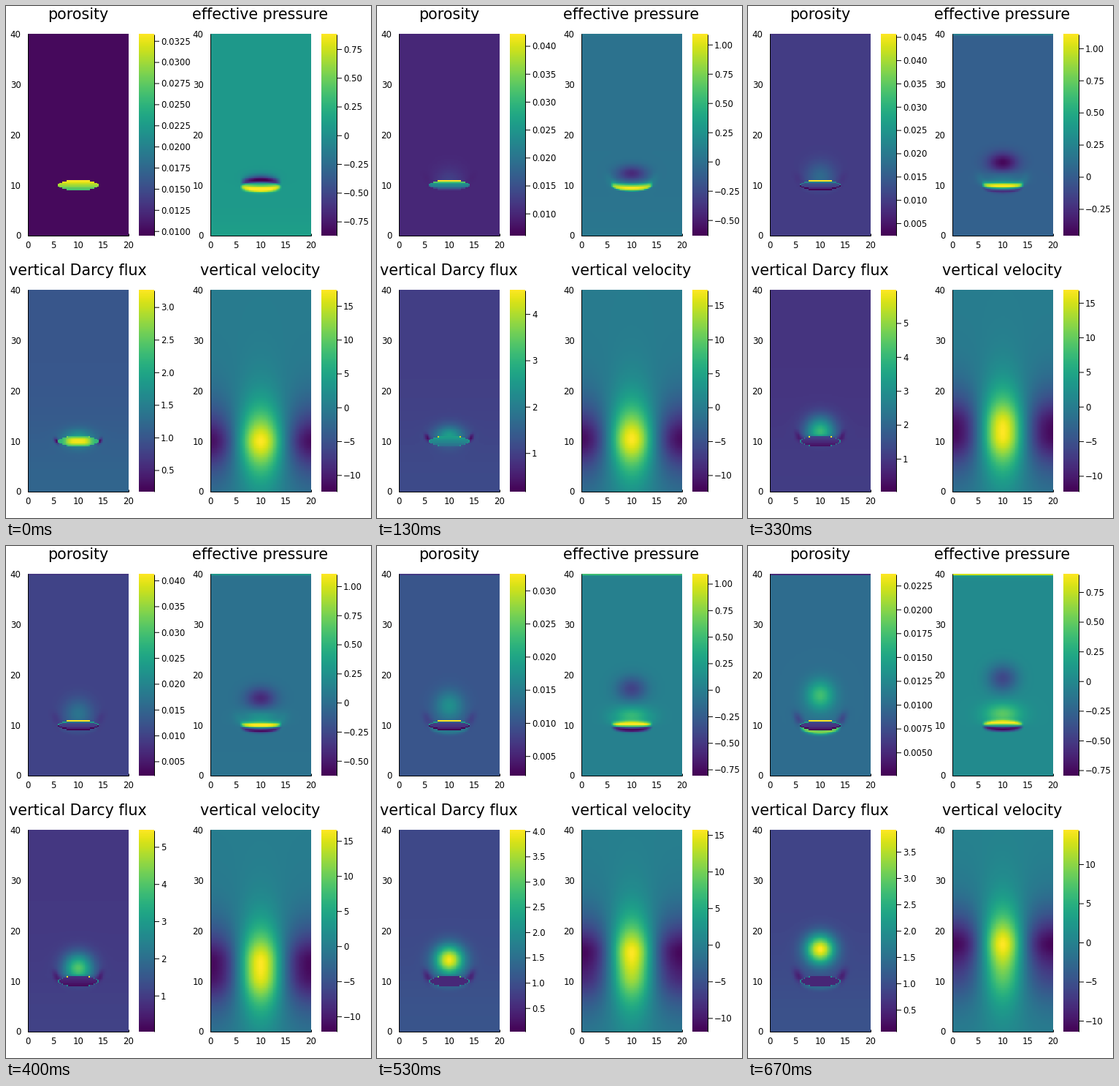
These frames come from a looping animation (500 by 700 pixels, 740 ms). A matplotlib script:

```python
import numpy as np
import matplotlib.pyplot as plt
from matplotlib.animation import FuncAnimation

W, H, DPI = 500, 700, 100
PX = 72 / DPI                      # points per pixel
TITLE, LABEL = 20.6, 11.77         # text sizes in pixels
TICK_MS, LOOP_MS = 10, 740
STEPS = 11
STARTS = [round(k * 20 / 3) * 10 for k in range(STEPS)]

# grid over 20 x 40, first row at the top; inclusion with half axes 4 and 1 at (10, 10)
CELL = 0.25
x, y = np.meshgrid(np.arange(CELL / 2, 20, CELL), np.arange(40 - CELL / 2, 0, -CELL))
dx, dy = x - 10, y - 10
half = np.sqrt(np.clip(1 - (dx / 4) ** 2, 0, 1))
inside = np.abs(dx / 4) ** 2.2 + np.abs(dy) ** 2.2 <= 1
top_rim = inside & ~np.roll(inside, 1, 0)
low_rim = inside & ~np.roll(inside, -1, 0)
side = inside & ~(np.roll(inside, 1, 1) & np.roll(inside, -1, 1))
corner = side & (top_rim | low_rim)
crown = corner & (dy > 0.8)
height = np.clip(dy / 0.875, -1, 1)
envelope = (0.55 + 0.45 * half) / (1 + np.exp((np.abs(dx) - 3.95) / 0.15))


def ramp(s, a, b):
    return min(max((s - a) / (b - a), 0), 1)


def mix(s, a, b):
    return a + (b - a) * s


def path(*points):
    ks, vs = zip(*points)
    return lambda k: np.interp(k, ks, vs)


def blob(cy, sx, sy):
    return np.exp(-(dx / sx) ** 2 - ((y - cy) / sy) ** 2)


def wings(cy, w):
    """Two slanted patches beside the tips of the inclusion."""
    off = np.abs(dx) - 4.3 - 0.35 * (y - cy)
    return np.exp(-(off / w) ** 2 - ((y - cy) / (1.6 * w)) ** 2)


def lens(c, low, up):
    """Band that follows the curve of the inclusion, c half heights off its middle."""
    d = dy - c * half
    return envelope * np.exp(-(d / np.where(d < 0, low, up)) ** 2)


def above(level):
    return 1 / (1 + np.exp(-np.clip((y - level) / 0.15, -50, 50)))


def rise(s):
    """Height of the fluid plume."""
    return 10.5 + 5.8 * s ** 2


# each field takes the progress s from 0 to 1 and its colour limits
def porosity(s, lo, hi):
    mid = 0.0055 + 0.0245 * np.exp(-(s / 0.42) ** 1.5)
    low = 0.004 + 0.0225 * np.exp(-(s / 0.25) ** 1.3)
    v = 0.0101 + 0.0072 * ramp(s, 0, 0.45) * blob(rise(s) - 0.4, 2.8, 3) * above(10)
    v += 0.0105 * s ** 3.5 * lens(-1.35, 0.5, 0.5)
    v -= 0.003 * s * wings(11.2, 0.9)
    body = np.where(height > 0, mid + (hi - mid) * np.abs(height) ** (1 + 6 * s),
                    mid + (mid - low) * height)
    v = np.where(inside, body, v)
    rim = lo + (hi - lo) * 0.55 * ramp(s, 0.1, 0.6)
    v[top_rim] = np.maximum(v[top_rim], rim)
    v[low_rim] += ramp(s, 0.1, 0.5) * (lo - v[low_rim])
    v[0] -= 0.005 * s ** 2.5
    return v


def pressure(s, lo, hi):
    early = 1 - ramp(s, 0, 0.2)
    v = 0.02 + 0.04 * early + 0.06 * (1 - s) ** 2 * np.exp(-y / 5)
    soft = mix(early, 0.2, 0.7)
    bright = lens(mix(s, -0.85, 0.5), mix(s, 0.75, 0.4), mix(s, 0.9, 0.45))
    v += hi * bright * np.exp(-(np.maximum(0, -dy - half) / soft) ** 2)
    v += lo * early * lens(0.95, 0.4, 0.8)
    v -= mix(early, 0.45, 0.15) * blob(11.5 + 7.8 * s ** 1.4, 3, mix(s, 1.3, 2.8))
    v += 0.45 * ramp(s, 0.3, 0.8) * above(10) * blob(mix(s, 10.4, 12.2), 3.7, mix(s, 1, 2.2))
    v += 0.15 * ramp(s, 0, 0.3) * (1 - s) * wings(11, 0.9)
    v += lo * ramp(s, 0.3, 0.6) * lens(mix(s, -1.5, -0.8), 0.45, 0.45)
    v += 1.4 * s ** 2 * np.exp(-(40 - y) / 0.2)
    return v


def flux(s, lo, hi):
    early = ramp(s, 0, 0.3)
    v = 1 - 0.13 * s + 0.18 * np.exp(-(y / 14) ** 2)
    cut = 1 - early * (1 - above(10.8))
    grow = ramp(s, 0, 0.5)
    v += mix(grow, 0.8, 3) * cut * blob(rise(s), 2.9, mix(grow, 1.8, 2.9))
    v -= mix(s, 0.9, 0.55) * wings(mix(early, 10, 11), mix(s, 0.4, 0.9))
    v += 0.4 * s ** 2 * lens(-1.3, 0.5, 0.5)
    core = np.exp(-(dx / 2.5) ** 4 - (dy / 0.8) ** 4)
    body = (mix(ramp(s, 0.25, 0.55), 2.2, 0.5) + (1 - ramp(s, 0, 0.2)) * core
            + 0.6 * early * (1 - ramp(s, 0.4, 0.8)) * height)
    v = np.where(inside, body, v)
    v[corner] = mix(mix(early, 0.65, 0.45), lo, hi)
    v[crown] = mix(mix(early, 0.8, 1) - 0.5 * ramp(s, 0.6, 1), lo, hi)
    return v


def velocity(s, lo, hi):
    def decay(c):
        r = np.abs(y - c) * np.pi / 10
        return (1 + r) * np.exp(-r)

    g = mix(0.8 * s ** 0.7, decay(10), decay(10.5 + 7 * s))
    f = lo + (hi - lo) * np.exp(-(dx / mix(s, 5.3, 4.6)) ** 2)
    return f * g / g.max()


def small_ticks(span):
    return (0.0025, "%.4f") if span < 0.0245 else (0.005, "%.3f")


def flux_ticks(span):
    return (0.5, "%.1f") if span < 4.2 else (1, "%d")


# title, left, top, field, lower limit, upper limit, tick rule
PANELS = [
    ("porosity", 30, 39, porosity,
     path((0, .0095), (3, .0044), (5, .0024), (8, .0021), (10, .0026)),
     path((0, .0333), (3, .0465), (5, .0456), (10, .0237)), small_ticks),
    ("effective pressure", 280, 39, pressure,
     path((0, -.87), (3, -.51), (5, -.455), (6, -.624), (8, -.805), (10, -.793)),
     path((0, .88), (1, 1.003), (3, 1.175), (5, 1.11), (8, 1.09), (10, .901)),
     lambda span: (0.25, "%.2f")),
    ("vertical Darcy flux", 30, 389, flux,
     path((3, .175), (5, .04), (8, .04), (10, .09)),
     path((0, 3.26), (1, 3.77), (3, 5.26), (5, 5.97), (6, 5.45), (8, 4.02), (10, 3.91)),
     flux_ticks),
    ("vertical velocity", 280, 389, velocity,
     lambda k: -12.4 + 1.05 * (k / 10) ** 2.6,
     lambda k: 17.32 - 2.97 * (k / 10) ** 2.6, lambda span: (5, "%d")),
]
PW, PH = 138, 275
BAR_LEFT, BAR_RIGHT = 152, 173

fig = plt.figure(figsize=(W / DPI, H / DPI), dpi=DPI, facecolor="white")
ax = fig.add_axes([0, 0, 1, 1])
ax.axis("off")


def text(px, py, s, size, ha):
    return ax.text(px, py, s, fontsize=size * PX, ha=ha, va="baseline",
                   family="DejaVu Sans", color="black")


def line(xs, ys, z=3):
    return ax.plot(xs, ys, color="black", lw=PX, zorder=z, solid_capstyle="butt")[0]


def image(data, left, right, top):
    return ax.imshow(data, cmap="viridis", vmin=0, vmax=1, aspect="auto", zorder=2,
                     interpolation="nearest", extent=(left, right, top + PH, top - 1))


class Panel:
    def __init__(self, title, left, top, field, low, high, rule):
        self.top, self.bar = top, left + BAR_RIGHT
        bottom = top + PH
        text(left + PW / 2 - 0.7, top - 21, title, TITLE, "center")
        line([left, left], [top - 1, bottom])
        line([left, left + PW], [bottom, bottom])
        for n in range(5):
            px, py = left + PW * n / 4, bottom - PH * n / 4
            text(px, bottom + 17.3, str(5 * n), LABEL, "center")
            text(left - 9.5, py + 4.3, str(10 * n), LABEL, "right")
            line([px, px], [bottom, bottom - 3], 1)
            line([left, left + 3], [py, py], 1)
        image(np.linspace(1, 0, 256)[:, None], left + BAR_LEFT, self.bar, top)
        line([self.bar, self.bar], [top, bottom])
        self.marks = line([], [])
        self.marks.set_snap(False)
        self.labels = [text(left + 182, top, "", LABEL, "left") for _ in range(12)]
        self.states = []
        for k in range(STEPS):
            lo, hi = low(k), high(k)
            u = np.clip((field(k / 10, lo, hi) - lo) / (hi - lo), 0, 1)
            self.states.append((u, lo, hi, *rule(hi - lo)))
        self.image = image(self.states[0][0], left, left + PW, top)

    def show(self, k):
        u, lo, hi, step, fmt = self.states[k]
        self.image.set_data(u)
        ticks = range(int(np.ceil(lo / step)), int(np.floor(hi / step)) + 1)
        xs, ys = [], []
        for label in self.labels:
            label.set_text("")
        for n, label in zip(ticks, self.labels):
            py = self.top + PH * (hi - n * step) / (hi - lo)
            label.set_text((fmt % (n * step)).replace("-", "\u2212") if n else "0")
            label.set_y(py + 4.3)
            xs += [self.bar, self.bar + 7, np.nan]
            ys += [py, py, np.nan]
        self.marks.set_data(xs, ys)


panels = [Panel(*spec) for spec in PANELS]
ax.set_xlim(0, W)
ax.set_ylim(H, 0)


def update(i):
    k = int(np.searchsorted(STARTS, i * TICK_MS, side="right")) - 1
    for panel in panels:
        panel.show(k)
    return []


anim = FuncAnimation(fig, update, frames=LOOP_MS // TICK_MS, interval=TICK_MS,
                     repeat=True, repeat_delay=0, blit=False)
plt.show()
```
